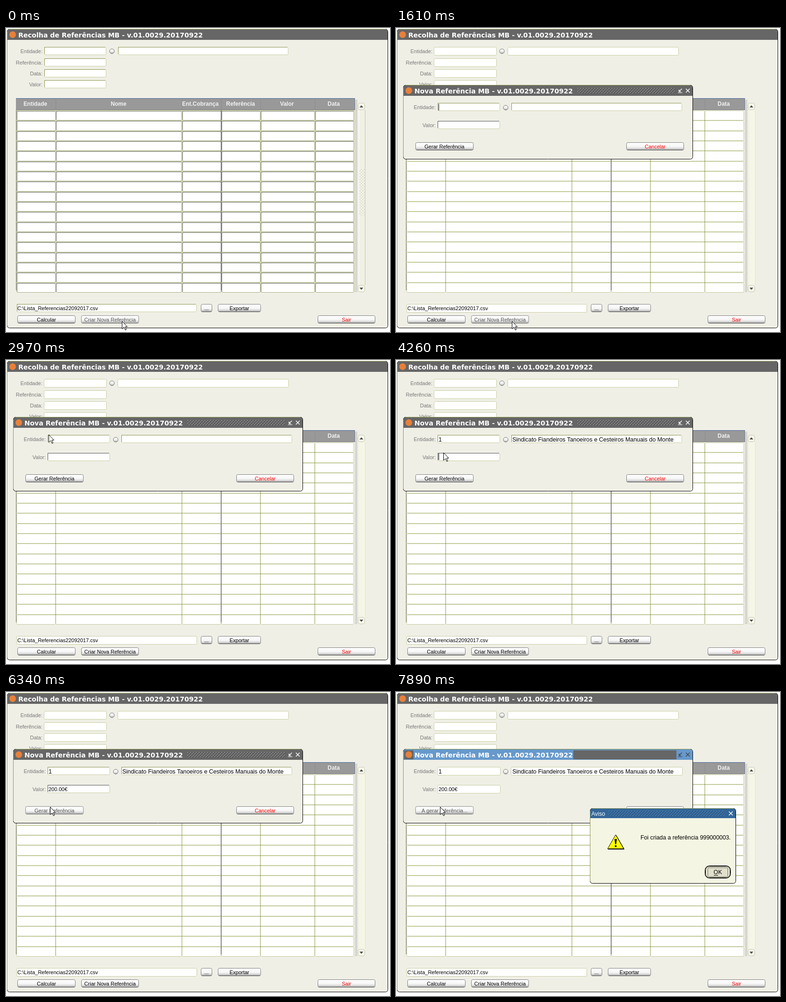
Recreate the animation shown at these times as an HTML page with a canvas. Size 812 by 641 pixels, loop 8 s.

```html
<!DOCTYPE html>
<html lang="pt">
<head>
<meta charset="utf-8">
<title>Recolha de Referências</title>
<style>
  html, body { margin: 0; width: 100%; height: 100%; overflow: hidden; background: #fff; }
  canvas { display: block; }
</style>
</head>
<body>
<canvas id="stage" width="812" height="641"></canvas>
<script>
const ctx = document.getElementById('stage').getContext('2d');
const LOOP = 8000;
const SANS = '"Liberation Sans", Arial, sans-serif';
const TITLE_FONT = 'bold 14px "DejaVu Sans", Verdana, sans-serif';
const PAPER = '#f0efe6', BAR = '#666', PALE = '#c9cfa3', OLIVE = '#8c9650', ORANGE = '#e8803a';
const COLUMNS = [22, 105, 372, 455, 538, 653, 736];
const ROWS = 18, PITCH = 64 / 3, TABLE_TOP = 174;
const rowY = i => Math.round(TABLE_TOP + i * PITCH);

// Stepped values: [start time, value]
const pointerSteps = [
  [0, [245, 618]], [2150, [361, 497]], [2410, [90, 157]],
  [4260, [100, 195]], [4510, [97, 238]], [4760, [93, 242]]
];
const valueSteps = [[0, ''], [5810, '2'], [6090, '200'], [6340, '200.00€']];
const caretSteps = [
  [0, null], [1610, [90, 160]], [2150, null], [2410, [90, 160]], [2970, null],
  [3470, [97, 160]], [3990, [90, 197]], [4510, null], [5280, [90, 197]], [5810, null]
];
const at = (steps, t) => steps.reduce((v, [start, next]) => t >= start ? next : v, steps[0][1]);

function rect(x, y, w, h, fill) {
  ctx.fillStyle = fill;
  ctx.fillRect(x, y, w, h);
}

function path(points, closed) {
  ctx.beginPath();
  points.forEach(([x, y]) => ctx.lineTo(x, y));
  if (closed) ctx.closePath();
}

function line(points, color, width = 1) {
  path(points);
  ctx.strokeStyle = color;
  ctx.lineWidth = width;
  ctx.stroke();
}

function polygon(points, fill, stroke, width = 1) {
  path(points, true);
  ctx.fillStyle = fill;
  ctx.fill();
  if (!stroke) return;
  ctx.strokeStyle = stroke;
  ctx.lineWidth = width;
  ctx.stroke();
}

function box(x, y, w, h, r, fill, stroke) {
  ctx.beginPath();
  ctx.roundRect(x + .5, y + .5, w - 1, h - 1, r);
  ctx.fillStyle = fill;
  ctx.fill();
  if (stroke) {
    ctx.strokeStyle = stroke;
    ctx.lineWidth = 1;
    ctx.stroke();
  }
}

function disc(x, y, r, fill, stroke) {
  ctx.beginPath();
  ctx.arc(x, y, r, 0, Math.PI * 2);
  if (fill) { ctx.fillStyle = fill; ctx.fill(); }
  if (stroke) { ctx.strokeStyle = stroke; ctx.lineWidth = 1; ctx.stroke(); }
}

function text(str, x, y, { color = '#000', font = '11px ' + SANS, align = 'left' } = {}) {
  ctx.font = font;
  ctx.fillStyle = color;
  ctx.textAlign = align;
  ctx.fillText(str, x, y);
}

const label = (str, x, y) => text(str, x, y, { color: '#777', align: 'right' });

// A text field; with an edge colour it is drawn sunken and slightly smaller.
function field(x, y, w, h, edge) {
  if (!edge) return box(x, y, w, h, 2, '#fff', PALE);
  x += 1;
  w -= 2;
  h -= 1;
  box(x, y, w, h, 2, '#fff', PALE);
  line([[x + .5, y + h - 2], [x + .5, y + .5], [x + w - 2, y + .5]], edge);
}

function button(str, x, y, w, { color = '#000', hover = false } = {}) {
  const h = 17;
  const shade = ctx.createLinearGradient(0, y, 0, y + h);
  shade.addColorStop(0, '#fff');
  shade.addColorStop(.55, '#f6f6f6');
  shade.addColorStop(.8, '#d4d4d4');
  shade.addColorStop(1, '#777');
  if (hover) box(x - 1, y - 1, w + 2, h + 2, 4, '#d6d6d0');
  box(x, y, w, h, 3, shade, hover ? '#999' : '#808080');
  line([[x + 3, y + h - .5], [x + w - 3, y + h - .5]], hover ? '#888' : '#5c5c5c');
  text(str, x + w / 2, y + 13, { color: hover ? '#555' : color, align: 'center' });
}

function knob(x, y) {
  const shade = ctx.createLinearGradient(0, y - 5, 0, y + 5);
  shade.addColorStop(0, '#fff');
  shade.addColorStop(.6, '#eee');
  shade.addColorStop(1, '#999');
  disc(x, y, 5, shade, '#777');
}

function bumps(x0, x1, y, light) {
  for (let row = 0; row < 4; row++)
    for (let x = x0 + (row % 2) * 3; x < x1; x += 6) {
      rect(x, y + row * 3, 1, 1, light);
      rect(x + 1, y + row * 3 + 1, 1, 1, '#111');
    }
}

function cross(x, y, color) {
  line([[x - 4, y - 4], [x + 4, y + 4]], color, 1.5);
  line([[x - 4, y + 4], [x + 4, y - 4]], color, 1.5);
}

function windowIcons(x, y, color) {
  line([[x + 4, y - 4], [x - 2, y + 2]], color, 1.5);
  line([[x - 2, y - 2], [x - 2, y + 2], [x + 2, y + 2]], color, 1.5);
  line([[x - 4, y + 4.5], [x + 5, y + 4.5]], color);
  cross(x + 16.5, y, color);
}

function frame(x, y, w, h, barH, barColor, fill) {
  box(x, y, w, h, 5, fill, '#000');
  line([[x + .5, y + h - 5], [x + .5, y + 5]], OLIVE);
  line([[x + 5, y + .5], [x + w - 5, y + .5]], OLIVE);
  ctx.beginPath();
  ctx.roundRect(x + 1, y + 1, w - 2, barH, [4, 4, 0, 0]);
  ctx.fillStyle = barColor;
  ctx.fill();
}

function table(active) {
  rect(738, 151, 5, 406, '#d6d6d0');
  rect(21, 148, 717, 25, '#999');
  rect(21, 148, 717, 1, '#4b6a9c');
  rect(21, 172, 717, 1, '#777');
  rect(737, 149, 1, 24, '#6c7c98');
  COLUMNS.slice(1, 6).forEach(x => rect(x, 150, 1, 22, '#8c8c90'));
  const heads = [['Entidade', 62], ['Nome', 238], ['Ent.Cobrança', 411],
    ['Referência', 496], ['Valor', 594], ['Data', 693]];
  heads.forEach(([s, x]) =>
    text(s, x, 164, { color: '#f2f2f2', font: 'bold 11.9px ' + SANS, align: 'center' }));

  if (active) rect(22, 173, 715, 384, '#d3d8b2');
  for (let i = 0; i < ROWS; i++) {
    const y = rowY(i), h = rowY(i + 1) - y;
    for (let c = 0; c < 6; c++) {
      const x = COLUMNS[c], w = COLUMNS[c + 1] - x;
      if (active) {
        box(x + 1, y + 1, w - 1, h - 1, 2, '#fff', '#a9ae86');
        line([[x + 1.5, y + h - 2], [x + 1.5, y + 1.5], [x + w - 1, y + 1.5]], '#777');
      } else {
        box(x, y, w, h, 2, '#fff', '#c3ca9b');
        if (i && c) rect(x - 1, y - 1, 2, 2, '#949d5f');
      }
    }
  }
  rect(21, 173, 1, 380, '#777');
  rect(454, 173, 2, 380, '#888');
}

function scrollbar(active) {
  rect(746, 165, 13, 385, active ? '#f0f0e5' : '#f6f6e6');
  if (active) rect(746, 173, 1, 369, '#fff');
  rect(759, 173, 1, 369, active ? '#c5cb9c' : '#e2e5c8');
  [[158, -1], [542, 1]].forEach(([y, dir]) => {
    box(744, y, 15, 15, 4, '#f8f8ee', '#c2c5a8');
    const tip = y + 7.5 + dir * 2.5, base = y + 7.5 - dir * 2;
    polygon([[747.5, base], [755.5, base], [751.5, tip]], '#444');
  });
  if (!active) return;
  for (let y = 298; y < 397; y += 3)
    for (let x = 748 + (397 - y) % 6; x < 758; x += 6) {
      rect(x, y, 1, 1, '#8f8f7c');
      rect(x + 1, y + 1, 1, 1, '#fff');
    }
}

function mainWindow(t) {
  const active = t < 1610, edge = active && OLIVE;
  frame(2, 2, 806, 631, 22, BAR, PAPER);
  disc(14, 14, 7, ORANGE);
  text('Recolha de Referências MB - v.01.0029.20170922', 26, 20, { color: '#fff', font: TITLE_FONT });
  if (t >= 810 && active) {
    bumps(425, 773, 9, '#fff');
    windowIcons(781, 14, '#fff');
  }
  ['Entidade:', 'Referência:', 'Data:', 'Valor:'].forEach((s, i) => {
    const y = Math.round(40.3 + i * 23.3);
    label(s, 77, y + 13);
    field(80, y, 133, 18, edge);
  });
  knob(224, 49);
  field(236, 40, 362, 18, edge);
  table(active);
  scrollbar(active);
  field(22, 582, 382, 18, edge);
  text('C:\\Lista_Referencias22092017.csv', 24, 595);
  button('...', 412, 582, 24);
  button('Exportar', 448, 582, 91);
  button('Calcular', 24, 606, 123);
  button('Criar Nova Referência', 159, 606, 122, { hover: t < 2150 });
  button('Sair', 659, 606, 122, { color: '#e00' });
}

function dialog(t) {
  const active = t < 7890;
  frame(15, 120, 613, 157, 22, active ? BAR : '#69c', PAPER);
  if (!active) {
    rect(17, 123, 20, 19, BAR);
    rect(375, 123, 218, 19, BAR);
  }
  disc(27, 132, 7, ORANGE);
  text('Nova Referência MB - v.01.0029.20170922', 39, 138, { color: '#fff', font: TITLE_FONT });
  if (active) bumps(384, 589, 127, '#fff');
  windowIcons(600.5, 132, active ? '#fff' : '#444');

  label('Entidade:', 84, 171);
  label('Valor:', 84, 209);
  field(87, 158, 134, 18, active && OLIVE);
  field(243, 158, 363, 18, active && OLIVE);
  field(87, 196, 134, 18, active && '#555');
  knob(232, 168);
  const entryFont = '12.4px ' + SANS;
  if (t >= 3470) text('1', 90, 172, { font: entryFont });
  if (t >= 3990)
    text('Sindicato Fiandeiros Tanoeiros e Cesteiros Manuais do Monte', 246, 172, { font: entryFont });
  text(at(valueSteps, t), 90, 209);
  const caret = at(caretSteps, t);
  if (caret) rect(...caret, 1, 14, '#000');

  button(t < 7110 ? 'Gerar Referência' : 'A gerar referência...', 41, 241, 123, { hover: t >= 4760 });
  button('Cancelar', 487, 241, 122, { color: '#f00' });
}

function alertBox() {
  frame(410, 245, 309, 159, 20, '#369', '#f5f5e4');
  const font = '12.3px ' + SANS;
  text('Aviso', 413, 261, { color: '#fff', font: '12px ' + SANS });
  bumps(450, 695, 251, '#9cf');
  cross(708, 256, '#fff');

  const sign = [[464.5, 301], [481.5, 330.5], [447.5, 330.5]];
  polygon(sign.map(([x, y]) => [x + 1, y + 1]), '#000', '#000');
  polygon(sign, '#ff0', '#000');
  polygon([[462, 310], [467, 310], [465.5, 321], [463.5, 321]], '#000');
  disc(464.5, 325, 2, '#000');

  text('Foi criada a referência 999000003.', 517, 311, { font });
  box(653, 366, 55, 27, 9, '#e1e0cc', '#000');
  box(654, 367, 53, 25, 8, '#e1e0cc', '#000');
  ctx.setLineDash([1, 1]);
  box(659, 370, 43, 20, 2, '#e1e0cc', '#000');
  ctx.setLineDash([]);
  text('OK', 680.5, 384, { font, align: 'center' });
  rect(672, 386, 9, 1, '#000');
}

function pointer([x, y]) {
  const shape = [[0, 0], [0, 16], [4, 12.5], [7, 18.5], [9, 17.5], [6.5, 11.5], [11, 11.5]];
  polygon(shape.map(([dx, dy]) => [x + dx + .5, y + dy + .5]), '#fff', '#000');
}

function spinner(x, y) {
  disc(x, y, 6, '#f4f8fc');
  ctx.lineWidth = 5.5;
  [['#1c8ce8', 0, 2], ['#5db8f8', 1.1, 1.7]].forEach(([color, from, to]) => {
    ctx.beginPath();
    ctx.arc(x, y, 8, from * Math.PI, to * Math.PI);
    ctx.strokeStyle = color;
    ctx.stroke();
  });
}

function draw(t) {
  rect(0, 0, 812, 641, '#fff');
  mainWindow(t);
  if (t >= 1610) dialog(t);
  if (t >= 7890) alertBox();
  if (t >= 810 && t < 1610) disc(245.5, 619.5, 10, null, '#000');
  if (t >= 6860 && t < 7890) spinner(93.5, 242);
  else pointer(at(pointerSteps, t));
}

function tick() {
  draw(performance.now() % LOOP);
  requestAnimationFrame(tick);
}
tick();
</script>
</body>
</html>
```
